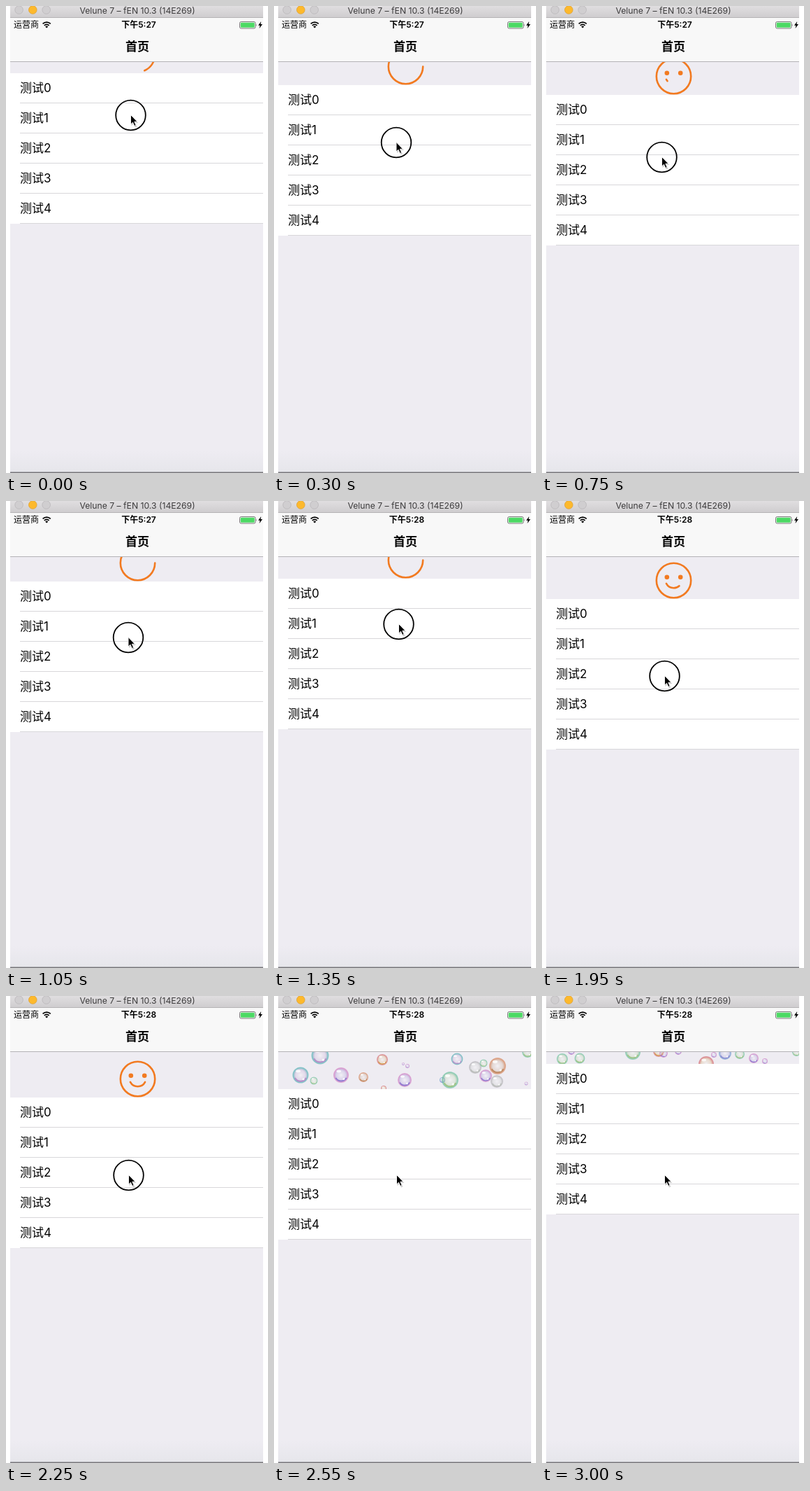
These frames come from a looping animation (375 px wide and 667 px high, 3150 ms). An HTML page:

```html
<!DOCTYPE html>
<html lang="zh-CN">
<head>
<meta charset="utf-8">
<style>
  html, body { margin: 0; width: 100%; height: 100%; overflow: hidden; background: #fff; }
  svg { display: block; width: 375px; height: 667px; font-family: Inter, "Noto Sans CJK SC", "Noto Sans CJK", sans-serif; }
</style>
</head>
<body>
<svg viewBox="0 0 375 667">
  <defs>
    <clipPath id="screen"><path d="M6 0H368V667H6z"/></clipPath>
    <linearGradient id="titleBar" x2="0" y2="1"><stop stop-color="#e0dee0"/><stop offset="1" stop-color="#cfcdcf"/></linearGradient>
    <linearGradient id="bottomShade" x2="0" y2="1"><stop stop-color="#eeecf2"/><stop offset="1" stop-color="#e6e6eb"/></linearGradient>
    <g id="gradients"></g>
  </defs>
  <g clip-path="url(#screen)">
    <path d="M6 0H368V667H6z" fill="#eeecf2"/>
    <path d="M6 635H368V666H6z" fill="url(#bottomShade)"/>
    <path d="M6 665.5H368V667H6z" fill="#77767a"/>

    <g id="bubbles"></g>
    <g id="face" fill="none" stroke="#f27a20" stroke-width="2.6" stroke-linecap="round">
      <circle id="outline" r="24.7" pathLength="1"/>
      <g id="eyes" fill="#f27a20" stroke="none"><circle cx="-9.7" cy="-4.7" r="3.3"/><circle cx="9.7" cy="-4.7" r="3.3"/></g>
      <path id="mouth" d="M-10.6 4.4A12 12 0 0 0 10.6 4.4" pathLength="1"/>
    </g>
    <g id="list" font-size="17"><path d="M6 0H368V215H6z" fill="#fff"/></g>

    <path d="M6 16H368V80H6z" fill="#f8f8f8"/>
    <path d="M6 79.5H368" stroke="#b4b3b6"/>
    <path d="M6 0H368V16H6z" fill="url(#titleBar)"/>
    <path d="M6 16.5H368" stroke="#b5b3b5"/>
    <g stroke-width=".8">
      <circle cx="18.6" cy="5.5" r="5.8" fill="#d0ced0" stroke="#b9b7b9"/>
      <circle cx="38.3" cy="5.5" r="5.8" fill="#fdb92c" stroke="#dea034"/>
      <circle cx="57.7" cy="5.5" r="5.8" fill="#d0ced0" stroke="#b9b7b9"/>
    </g>
    <text x="188" y="11" font-size="12.2" text-anchor="middle" fill="#3c3b3c">Velune 7 – fEN 10.3 (14E269)</text>

    <text x="11" y="31" font-size="12">运营商</text>
    <g fill="none" stroke="#000" stroke-width="1.7">
      <path d="M52.6 25.4A8 8 0 0 1 63.8 25.4M54.8 27.8A4.8 4.8 0 0 1 61.6 27.8"/>
      <path d="M58.2 31.6L56.2 29.5A2.9 2.9 0 0 1 60.2 29.5z" fill="#000" stroke="none"/>
    </g>
    <text id="clock" x="190" y="31" font-size="12" font-weight="600" text-anchor="middle"></text>
    <rect x="334.5" y="22.5" width="22.5" height="9.5" rx="2" fill="#fff" stroke="#555" stroke-width=".8"/>
    <rect x="335.7" y="23.7" width="20" height="7.1" rx="1" fill="#4cd964"/>
    <path d="M357.8 25.5q1.5 1.8 0 3.6z" fill="#444"/>
    <path d="M365.2 22L361 27.8H363.5L362.6 32L367 26.1H364.4z"/>
    <text x="188" y="64" font-size="17" font-weight="600" text-anchor="middle">首页</text>
  </g>
  <g id="pointer">
    <circle id="ring" r="21.3" fill="none" stroke="#000" stroke-width="1.8"/>
    <path d="M1 1.5V15L4 12L6.5 17.5L9 16.3L6.5 11H11z" fill="#000" opacity=".2"/>
    <path d="M0 -.5V13L3 10.2L5.3 15.4L7.6 14.4L5.3 9.3H9.5z" stroke="#fff" stroke-width=".9"/>
  </g>
</svg>
<script>
const STEP = 150, LOOP = 3150, RELEASE = 16, RISE = 12;
const $ = id => document.getElementById(id);

// One value per step
const listTop = [96, 104, 113, 123, 127, 127, 119, 115, 115, 111, 109, 123, 135, 140, 145, 145, 135, 133, 133, 133, 97];
const touchX = [178.5, 177, 175, 173, 172, 171.5, 173, 175, 177, 178.5, 178, 175.5, 175.5, 175.5, 175.5, 175.5];
const touchY = [156, 176, 195, 210, 216, 216, 203, 195, 188, 176, 188, 217, 238, 250, 256, 256];

const palette = {
  teal: ['#3fa9ac', '#b58bc8'], green: ['#58b992', '#a0c486'], pink: ['#cd72bd', '#8d78cf'],
  orange: ['#d27748', '#bd8a62'], red: ['#d05a62', '#d39a4a'], blue: ['#5b8fc9', '#8b8ad2'], gray: ['#aaa8ad', '#b9bdb8']
};

// x, y below the list top, radius, colour
const firstBubbles = [
  [66, -48, 12.5, 'teal'], [38, -20, 11.5, 'teal'], [57, -12, 5.5, 'green'], [96, -20, 11, 'pink'],
  [128, -17, 7, 'orange'], [155, -42, 8, 'red'], [157, -1, 4, 'red'], [187, -13, 10, 'pink'],
  [191, -33, 3, 'pink'], [185, -36, 2, 'pink'], [241, -13, 4, 'blue'], [252, -13, 12, 'green'],
  [262, -43, 8.5, 'teal'], [288, -31, 9, 'gray'], [300, -37, 5.5, 'green'], [320, -33, 12, 'orange'],
  [303, -19, 9, 'pink'], [319, -11, 9, 'gray'], [361, -8, 2.5, 'pink'], [363, -53, 8, 'green']
];
const laterBubbles = [
  [29, -7, 8, 'green'], [54, -8, 7.5, 'green'], [42, -18, 5, 'pink'], [130, -17, 11, 'green'],
  [167, -18, 8, 'red'], [174, -15, 6, 'pink'], [195, -18, 5, 'pink'], [235, 0, 11, 'red'],
  [246, -13, 4, 'pink'], [262, -15, 9, 'blue'], [283, -14, 7, 'green'], [303, -8, 7, 'pink'],
  [319, -4, 4, 'pink'], [364, -17, 6, 'green']
];

$('gradients').innerHTML = Object.entries(palette).map(([name, [rim, glow]]) => `
  <radialGradient id="${name}">
    <stop stop-color="#fff" stop-opacity=".25"/>
    <stop offset=".6" stop-color="${glow}" stop-opacity=".2"/>
    <stop offset=".9" stop-color="${rim}" stop-opacity=".65"/>
    <stop offset="1" stop-color="${rim}" stop-opacity=".5"/>
  </radialGradient>`).join('');

const bubble = ([x, y, r, name]) => `
  <g transform="translate(${x} ${y}) scale(${r})">
    <circle r="1" fill="url(#${name})"/>
    <path d="M-.7 .35A.8 .8 0 0 0 .7 .35" fill="none" stroke="${palette[name][1]}" stroke-width=".16"/>
    <ellipse cx="-.3" cy="-.5" rx=".3" ry=".18" fill="#fff" opacity=".8"/>
    <circle cx=".35" cy=".5" r=".14" fill="#fff" opacity=".8"/>
  </g>`;
$('bubbles').innerHTML = firstBubbles.map(bubble).join('') +
  laterBubbles.map(([x, y, ...look]) => bubble([x, y + 3 * RISE, ...look])).join('');

for (let i = 0; i < 5; i++) {
  $('list').innerHTML += `<text x="20" y="${i * 43 + 27.3}">测试${i}</text>
    <path d="M20 ${i * 43 + 42.5}H368" stroke="#d8d7da"/>`;
}

const move = (id, x, y) => $(id).setAttribute('transform', `translate(${x} ${y})`);
const show = (id, on) => $(id).setAttribute('visibility', on ? 'inherit' : 'hidden');
const reveal = (id, part) => $(id).setAttribute('stroke-dasharray', part >= 1 ? 'none' : `${part} 2`);

function draw(step) {
  const top = listTop[step], pulling = step < RELEASE, complete = top > 125;
  move('list', 0, top);
  move('face', 188.5, top - 26.5);
  show('face', pulling);
  reveal('outline', complete ? 1 : (top - 88.4) / 41);
  show('eyes', complete);
  show('mouth', complete);
  reveal('mouth', Math.max(0, (top - 125) / 18));

  move('bubbles', 0, top - (step - 17) * RISE);
  show('bubbles', !pulling);

  move('pointer', pulling ? touchX[step] : 175.5, pulling ? touchY[step] : 256);
  show('ring', pulling);
  $('clock').textContent = step < 8 ? '下午5:27' : '下午5:28';
}

const start = performance.now();
function tick() {
  draw(Math.floor((performance.now() - start) % LOOP / STEP));
  requestAnimationFrame(tick);
}
tick();
</script>
</body>
</html>
```
